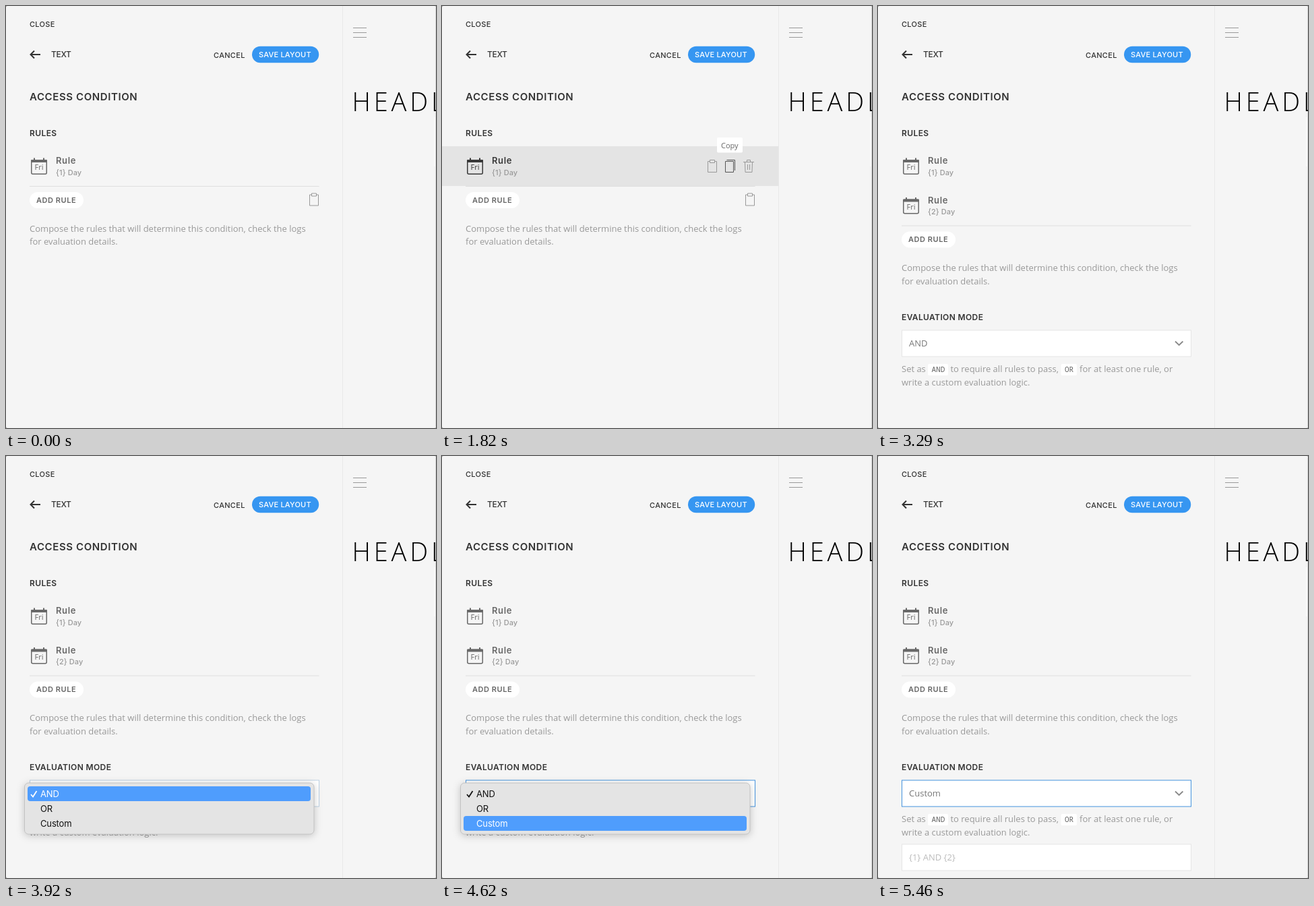
Animation, 638 px wide and 626 px high, one loop 5740 ms. Source, as an HTML page:

```html
<!DOCTYPE html>
<html lang="en">
<head>
<meta charset="utf-8">
<title>Access condition</title>
<style>
  html, body { margin: 0; width: 100%; height: 100%; overflow: hidden; background: #f5f5f5; }
  svg { display: block; width: 638px; height: 626px; }
  text { white-space: pre; }
  .ui { font-family: Inter, sans-serif; }
  .body { font-family: "Open Sans", sans-serif; font-size: 13px; }
  .code { font-family: "Noto Sans Mono", monospace; font-size: 11px; }
  .menu { font-family: Inter, sans-serif; font-size: 13px; letter-spacing: -.15px; }
  .line { fill: none; }
</style>
</head>
<body>
<svg id="stage" viewBox="0 0 638 626"></svg>
<script>
const LOOP = 5740, STEP = 70, ROW = 58.5;
const stage = document.getElementById('stage');

const ramp = (t, start, length) => Math.min(1, Math.max(0, (t - start) / length));
const within = (t, from, to) => t >= from && t < to;
const mix = (a, b, k) => `rgb(${a.map((v, i) => Math.round(v + (b[i] - v) * k))})`;
const gray = (a, b, k) => mix([a, a, a], [b, b, b], k);

const ui = (x, y, size, spacing, text, color = '#333', weight = 600) =>
  `<text class="ui" x="${x}" y="${y}" font-size="${size}" letter-spacing="${spacing}" fill="${color}" font-weight="${weight}">${text}</text>`;
const body = (x, y, text, color = '#999') =>
  `<text class="body" x="${x}" y="${y}" fill="${color}">${text}</text>`;
const box = (x, y, w, h, fill, radius = 0, extra = '') =>
  `<rect x="${x}" y="${y}" width="${w}" height="${h}" rx="${radius}" fill="${fill}" ${extra}/>`;
const line = (d, color, width = 1) =>
  `<path class="line" d="${d}" stroke="${color}" stroke-width="${width}"/>`;
const group = (x, y, content, opacity = 1) =>
  `<g transform="translate(${x} ${y})" opacity="${opacity}">${content}</g>`;

const clipboard = (x, y) => group(x, y,
  line('M3.5 2.5H.5V18.5H13.5V2.5H10.5M3.5 .5H10.5V4.5H3.5Z', '#999'));
const copy = (x, y, active) => group(x, y,
  line('M.5 2.5H12.5V18.5H.5ZM2.5 .5H14.5V16', active ? '#555' : '#999'));
const trash = (x, y) => group(x, y,
  line('M0 3.5H16M5.5 3V.5H10.5V3M2.5 3.5L3 18.5H13L13.5 3.5M6.5 7V15M9.5 7V15', '#999'));

function ruleRow(number, hover, icons, y) {
  const color = gray(104, 56, hover);
  return group(0, y,
    (hover > 0 ? box(0, 208, 499, ROW + .5, '#e4e4e4', 0, `opacity="${hover}"`) : '') +
    box(37.75, 228.75, 22.5, 20.5, 'none', 2, `stroke="${color}" stroke-width="1.5"`) +
    box(37, 228, 24, 4, color, 1) +
    line('M42 225.5V229M56 225.5V229', color, 2) +
    `<text class="body" x="49" y="243" text-anchor="middle" fill="${color}" style="font-size:11px">Fri</text>` +
    ui(74, 234, 13, .6, 'Rule', color) +
    ui(74, 250.5, 11, .1, `{${number}} Day`, '#999', 500) +
    icons);
}

function header() {
  return ui(35, 31, 11, .3, 'CLOSE', '#333', 500) +
    line('M51 72H36.5M42 66.5L36.5 72L42 77.5', '#333', 2) +
    ui(67, 76, 12, -.3, 'TEXT', '#333', 500) +
    ui(308, 77, 11, .3, 'CANCEL', '#333', 500) +
    box(365, 59.75, 99.25, 24.5, '#3696f1', 12.25) +
    ui(375, 75.5, 11, .2, 'SAVE LAYOUT', '#fff', 500) +
    ui(35, 140, 15, .6, 'ACCESS CONDITION') +
    ui(35, 193, 12, .4, 'RULES');
}

function preview() {
  return line('M515 32.5H535M515 39.5H535M515 46.5H535', '#999') +
    '<text class="body" x="513.5" y="156" letter-spacing="4.9" style="font-size:38px;font-weight:300">HEADLINE</text>';
}

function evaluation(t) {
  const custom = t >= 5460;
  const border = mix([229, 229, 229], [69, 147, 222], ramp(t, 3850, 280));
  const chip = (x, w, text) => box(x, 531, w, 17, '#fff', 2) +
    `<text class="code" x="${x + 5.5}" y="543" fill="#666">${text}</text>`;
  return ui(35, 465.5, 12, .37, 'EVALUATION MODE') +
    box(35.5, 481, 429, 39, '#fff', 0, `stroke="${border}"`) +
    body(46, 505, custom ? 'Custom' : 'AND', '#777') +
    line('M441 497.5L446.7 503L452.4 497.5', '#888', 1.8) +
    body(35, 543, 'Set as') + chip(74, 30, 'AND') +
    body(107.5, 543, 'to require all rules to pass,') + chip(271.5, 23.5, 'OR') +
    body(299, 543, 'for at least one rule, or') +
    body(35, 562.5, 'write a custom evaluation logic.') +
    (custom ? box(35.5, 576, 429, 39, '#fff', 0, 'stroke="#e5e5e5"') +
      body(46, 600, '{1} AND {2}', '#bbb') : '');
}

function menu(t) {
  if (!within(t, 3920, 5460)) return '';
  const blink = within(t, 4970, 5040);
  const selected = blink ? -1 : t < 4340 ? 0 : t < 4550 ? 1 : 2;
  const ink = i => i === selected ? '#fff' : '#111';
  const items = ['AND', 'OR', 'Custom'].map((label, i) =>
    (i === selected ? box(32, 490 + 22 * i, 420, 22, '#4f9dfd', 4) : '') +
    `<text class="menu" x="51" y="${506 + 22 * i}" fill="${ink(i)}">${label}</text>`).join('');
  return `<g opacity="${1 - ramp(t, 5110, 330)}">` +
    box(27.5, 485, 429.5, 76, '#e4e4e4', 6,
      'stroke="#c2c2c2" style="filter:drop-shadow(0 2px 6px rgba(0,0,0,.2))"') +
    items + line('M37 502L40 505.5L45.5 497', ink(0), 1.8) + '</g>';
}

function draw(t) {
  const doubled = t >= 2520;
  const shift = doubled ? ROW : 0;
  const firstHover = doubled
    ? ramp(t, 2520, 210) - ramp(t, 2940, 140)
    : ramp(t, 140, 210);
  const secondHover = 1 - ramp(t, 2520, 210) + ramp(t, 2940, 140) - ramp(t, 3150, 140);
  const actions = active => copy(420, 228, active) + trash(447, 228);
  const firstIcons = within(t, 210, 3010)
    ? (doubled ? '' : clipboard(394, 228)) + actions(t >= 1190) : '';
  const secondIcons = within(t, 3010, 3220) ? actions(false) : '';

  stage.innerHTML =
    box(0, 0, 638, 626, '#888') + box(0, 0, 638, 626, '#f5f5f5', 2) +
    line('M499.5 0V626', '#e8e8e8') +
    line('M636 165V238', '#fff') + line('M637.5 2V624', '#d2d2d2') +
    header() +
    (within(t, 2870, 3150) ? '' : preview()) +
    line(`M35 ${267.5 + shift}H464.5`, '#dfdfdf') +
    ruleRow(1, firstHover, firstIcons, 0) +
    (doubled ? ruleRow(2, secondHover, secondIcons, ROW) : '') +
    group(0, shift,
      box(35, 276, 80, 24, '#fff', 12) +
      ui(45, 291.5, 11, .55, 'ADD RULE', '#666') +
      (t < 3150 ? clipboard(450, 277.5) : '') +
      body(35, 334.5, 'Compose the rules that will determine this condition, check the logs') +
      body(35, 354, 'for evaluation details.')) +
    (within(t, 1750, 2520) ? group(0, 0,
      box(408, 195, 38, 22.5, '#fff', 2) +
      '<text class="body" x="414" y="211" fill="#666" style="font-size:11px">Copy</text>',
      ramp(t, 1680, 140)) : '') +
    (doubled ? evaluation(t) : '') +
    menu(t);
}

// The picture advances in fixed steps, like a screen recording.
let shown = -1;
function tick() {
  const t = Math.floor(performance.now() % LOOP / STEP) * STEP;
  if (t !== shown) draw(shown = t);
  requestAnimationFrame(tick);
}
tick();
</script>
</body>
</html>
```
